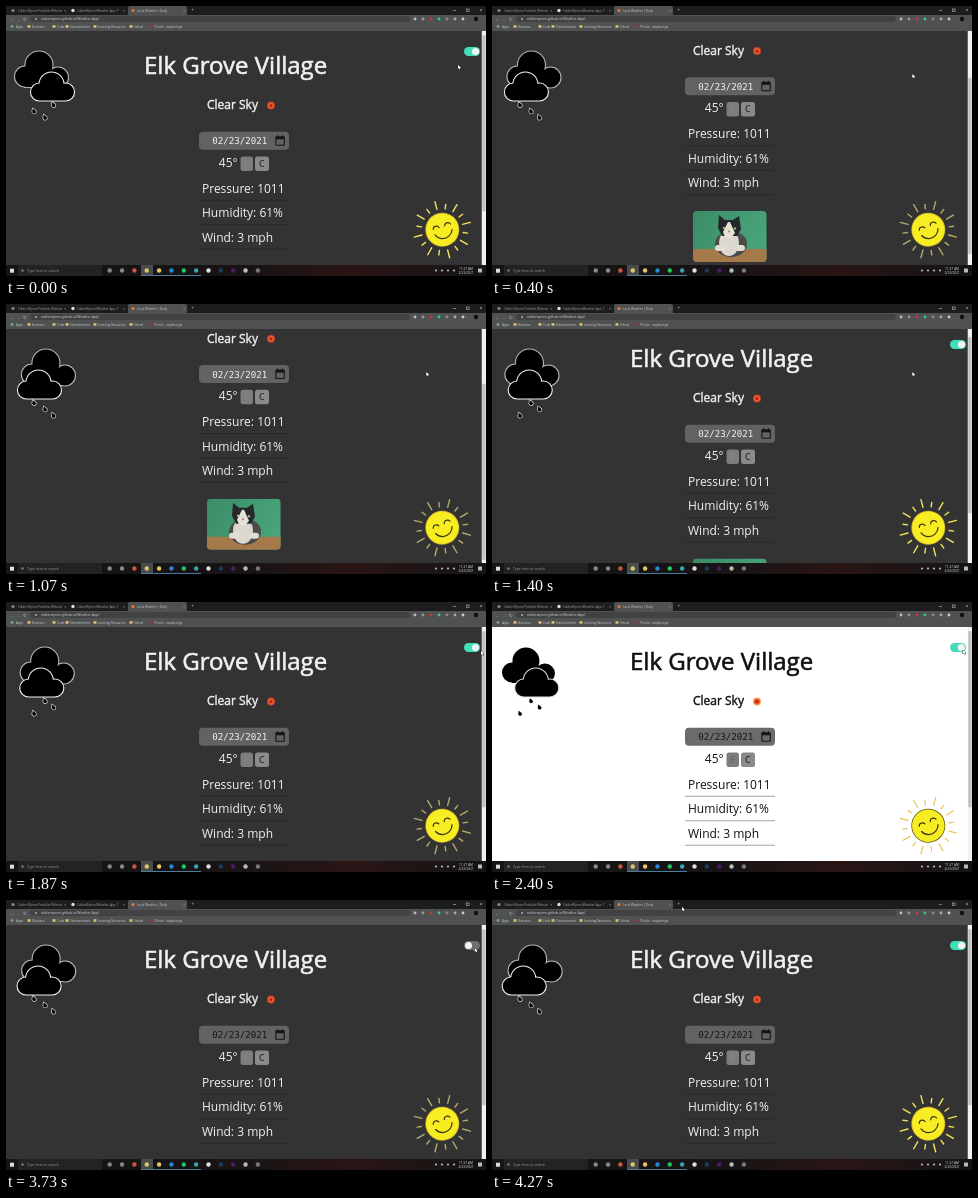
Recreate the animation shown at these times as an HTML page with a canvas. Size 480x270 px, loop 4340 ms.

```html
<!DOCTYPE html>
<html lang="en">
<head>
<meta charset="utf-8">
<title>Weather page</title>
<style>
html, body { margin: 0; width: 100%; height: 100%; overflow: hidden; background: #333; }
canvas { display: block; width: 480px; height: 270px; }
</style>
</head>
<body>
<canvas id="stage" width="480" height="270"></canvas>
<script>
const ctx = document.getElementById('stage').getContext('2d');
const LOOP = 4340, LIGHT_ON = 2330, LIGHT_OFF = 3690, MAX_SCROLL = 64.7;
const SANS = '"Open Sans", sans-serif', MONO = '"DejaVu Sans Mono", monospace';

const clamp = (v) => Math.max(0, Math.min(1, v));
const ease = (p) => p < 0.5 ? 4 * p ** 3 : 1 - 4 * (1 - p) ** 3;
const tween = (t, start, length) => ease(clamp((t - start) / length));
const lerp = (a, b, p) => a + (b - a) * p;

function rect(x, y, w, h, color, r = 0) {
  ctx.fillStyle = color;
  ctx.beginPath();
  ctx.roundRect(x, y, w, h, r);
  ctx.fill();
}

function oval(x, y, rx, ry, color) {
  ctx.fillStyle = color;
  ctx.beginPath();
  ctx.ellipse(x, y, rx, ry, 0, 0, Math.PI * 2);
  ctx.fill();
}

const dot = (x, y, r, color) => oval(x, y, r, r, color);

function shape(points, color) {
  ctx.fillStyle = color;
  ctx.beginPath();
  points.forEach(([x, y]) => ctx.lineTo(x, y));
  ctx.closePath();
  ctx.fill();
}

function line(points, color, width = 0.6) {
  ctx.strokeStyle = color;
  ctx.lineWidth = width;
  ctx.beginPath();
  points.forEach(([x, y]) => ctx.lineTo(x, y));
  ctx.stroke();
}

function text(str, x, y, size, color, family = SANS, weight = 400) {
  ctx.font = `${weight} ${size}px ${family}`;
  ctx.fillStyle = color;
  ctx.fillText(str, x, y);
}

function heavyText(str, x, y, size, color, stroke) {
  text(str, x, y, size, color);
  ctx.strokeStyle = color;
  ctx.lineWidth = stroke;
  ctx.strokeText(str, x, y);
}

function browser() {
  rect(0, 0, 480, 9, '#1c1d1e');
  rect(122, 0, 59, 10, '#505153', 2);
  rect(0, 9, 480, 16, '#505153');
  rect(24, 10, 380, 6, '#414244', 3);

  dot(7, 4.5, 1.6, '#888');
  text('Calder Wynne Portfolio Website', 12, 5.6, 3, '#a0a0a0');
  dot(67, 4.5, 1.7, '#ddd');
  text('CalderWynne/Weather-App: T', 71, 5.6, 3, '#a0a0a0');
  dot(127, 4.5, 1.6, '#e07b3a');
  text('Local Weather | Daily', 131, 5.6, 3, '#ccc');
  [58, 117, 177].forEach((x) => text('×', x, 6, 4, '#aaa'));
  text('+', 185.5, 6, 4.5, '#bbb');

  line([[447, 4.5], [450, 4.5]], '#bbb');
  ctx.strokeRect(460.5, 3, 2.6, 2.6);
  text('×', 473.5, 6.2, 5, '#ccc');

  text('←', 3, 14.8, 4.5, '#bbb');
  text('→', 10, 14.8, 4.5, '#888');
  text('↻', 17, 14.8, 4.5, '#bbb');
  dot(30, 13, 1, '#aaa');
  text('calderwynne.github.io/Weather-App/', 35, 14.2, 3.4, '#d0d0d0');
  ['#bbb', '#999', '#c43a32', '#35c98a', '#888', '#aaa', '#ccc']
    .forEach((c, i) => dot(409 + i * 8, 13, 1.4, c));
  dot(470, 13, 2.2, '#111');

  dot(6, 20.5, 1.4, '#78a878');
  text('Apps', 10, 21.7, 3, '#ccc');
  const folders = [['Business', 26], ['Code', 51], ['Entertainment', 64],
    ['Learning Resources', 92], ['School', 128]];
  for (const [name, x] of folders) {
    rect(x - 4.5, 19.2, 3, 2.5, '#e5c36a');
    text(name, x, 21.7, 3, '#ccc');
  }
  dot(144, 20.5, 1.3, '#a33');
  text('Pi-hole - raspberrypi', 148, 21.7, 3, '#ccc');
}

function taskbar() {
  const tint = ctx.createLinearGradient(0, 0, 480, 0);
  tint.addColorStop(0, '#141516');
  tint.addColorStop(0.5, '#181314');
  tint.addColorStop(0.72, '#2a1515');
  tint.addColorStop(1, '#141415');
  rect(0, 259, 480, 11, tint);
  rect(4, 262.7, 4, 4, '#ddd');
  rect(12, 259, 84, 11, '#222325');
  dot(16.5, 264.5, 1.3, '#777');
  text('Type here to search', 21, 266, 3.5, '#999');
  rect(135, 259, 12, 11, '#4a4b4c');
  rect(135, 269, 60, 1, '#4c7c9a');
  const icons = ['#888', '#888', '#d0553a', '#d9c86a', '#e9c568', '#2987d1',
    '#24c565', '#35a6b5', '#ddd', '#1b3c5c', '#4d1c60', '#bbb', '#777'];
  icons.forEach((c, i) => dot(103.7 + i * 12.35, 264.5, 2.2, c));
  [430, 436, 442, 448].forEach((x) => dot(x, 264.5, 1.1, '#bbb'));
  text('11:27 AM', 453, 263.6, 3.2, '#ddd');
  text('2/23/2021', 452.5, 268, 3.2, '#ddd');
  rect(472, 262.5, 4, 4, '#bbb', 0.6);
}

function toggle(on) {
  const green = [66, 222, 184], gray = [112, 112, 112];
  const mix = gray.map((g, i) => Math.round(lerp(g, green[i], on)));
  rect(458, 41, 16, 9, `rgb(${mix})`, 4.5);
  dot(lerp(462.5, 469.5, on), 45.5, 3.5, '#f4f4f4');
}

function catPhoto(x, y) {
  ctx.save();
  ctx.beginPath();
  ctx.roundRect(x, y, 73.5, 51, 4);
  ctx.clip();
  ctx.translate(x, y);
  const wall = ctx.createLinearGradient(0, 0, 73, 36);
  wall.addColorStop(0, '#3a8c66');
  wall.addColorStop(1, '#4aa67c');
  rect(0, 0, 74, 51, wall);
  rect(0, 38, 74, 13, '#a5794a');
  oval(38, 33, 16, 13, '#4b4c49');
  oval(36, 32, 10, 13, '#dcd8cf');
  shape([[26, 4], [32, 9], [40, 9], [46, 5], [48, 18], [44, 25], [29, 25], [25, 17]], '#24282a');
  shape([[35, 11], [37, 11], [42, 22], [38, 27], [32, 26], [30, 21]], '#e6e1d9');
  dot(31, 17, 1.2, '#aeb277');
  dot(42, 17.5, 1.2, '#aeb277');
  dot(36, 20.5, 1, '#a97d76');
  rect(22, 34, 11, 6, '#e2ddd4', 3);
  rect(42, 34, 10, 6, '#e2ddd4', 3);
  ctx.restore();
}

function calendarIcon(x, y, back) {
  rect(x, y + 1, 9.5, 9.5, '#151515', 1);
  rect(x + 1.8, y, 1.2, 2, '#151515');
  rect(x + 6.5, y, 1.2, 2, '#151515');
  rect(x + 1.1, y + 4, 7.3, 5.4, back);
}

function page(scroll, light, on, dateColor) {
  const ink = light ? '#111' : '#f2f2f2';
  const field = light ? '#6b6b6b' : '#626262';
  ctx.save();
  ctx.translate(0, -scroll);
  heavyText('Elk Grove Village', 138, 67.5, 24, ink, 0.6);
  heavyText('Clear Sky', 201, 103.3, 12, ink, 0.4);
  dot(265, 99.5, 4, light ? '#f6b25c' : '#b8432b');
  dot(265, 99.5, 3.1, '#f2562c');
  dot(265, 99.7, 1.4, '#a3261a');
  toggle(on);

  rect(193, 125.7, 90, 18, field, 4);
  text('02/23/2021', 206.3, 138.2, 9.15, dateColor, MONO);
  calendarIcon(269.3, 129.3, field);

  text('45°', 212.8, 160.7, 12, ink);
  rect(234.5, 150.5, 12.5, 14.5, '#7d7d7d', 2.5);
  text('F', 238.5, 161, 8.5, light ? '#5c5c5c' : '#8a8a8a');
  rect(249, 150.5, 14, 14.5, '#8a8a8a', 2.5);
  text('C', 253, 161, 8.5, '#2c2c2c', SANS, 600);

  ['Pressure: 1011', 'Humidity: 61%', 'Wind: 3 mph'].forEach((row, i) => {
    text(row, 196, 186.8 + i * 24.5, 12, ink);
    rect(193, 193.8 + i * 24.5, 90, 1, light ? '#a5a5a5' : '#292929');
  });
  catPhoto(201, 259.5);
  ctx.restore();
}

function blob(circles, base, edge) {
  const path = new Path2D();
  for (const [x, y, r] of circles) {
    path.moveTo(x + r, y);
    path.arc(x, y, r, 0, Math.PI * 2);
  }
  path.rect(...base);
  ctx.strokeStyle = edge;
  ctx.lineWidth = 2.2;
  ctx.stroke(path);
  ctx.fillStyle = '#000';
  ctx.fill(path);
}

function raindrop(x, y, edge) {
  ctx.beginPath();
  ctx.moveTo(x - 1.3, y - 2.8);
  ctx.quadraticCurveTo(x + 3, y - 0.5, x + 1.7, y + 1.6);
  ctx.quadraticCurveTo(x - 1, y + 3.2, x - 1.8, y + 0.6);
  ctx.closePath();
  ctx.strokeStyle = edge;
  ctx.lineWidth = 1.4;
  ctx.stroke();
  ctx.fillStyle = '#000';
  ctx.fill();
}

// The two clouds sway in opposite directions.
function cloud(t, light) {
  const edge = light ? '#ddd' : '#f0f0f0';
  const sway = Math.cos(t / 296 * Math.PI * 2);
  const back = 39 - 4 * sway, front = 39 + 7.5 * sway;
  blob([[back - 2, 59, 13.5], [back - 16, 70.5, 10], [back + 17, 71.5, 10]],
    [back - 16, 66, 33, 15], light ? '#fff' : '#b5b5b5');
  blob([[front - 13, 86, 8.5], [front - 1, 78.5, 12], [front + 13, 86, 8.5]],
    [front - 13, 80, 26, 14.5], edge);
  const step = Math.floor(t / 180);
  [28, 39, 47.5].forEach((x, i) => {
    const phase = (step + 1 + i) % 3;
    raindrop(x, 99 + phase * 6.3, light ? '#fff' : '#ddd');
  });
}

function sun(t, light) {
  const beat = Math.floor(t / 110) % 2;
  const rayColor = light ? '#eebd4a' : beat ? '#b3a970' : '#f3e25a';
  ctx.save();
  ctx.translate(436.3, 223.7);
  ctx.lineCap = 'round';
  for (let i = 0; i < 16; i++) {
    const a = (i + 0.5) / 16 * Math.PI * 2 + (beat ? 0.06 : -0.06);
    const far = (i + beat) % 2 ? 29 : 25.5;
    line([[Math.cos(a) * 21, Math.sin(a) * 21], [Math.cos(a) * far, Math.sin(a) * far]],
      rayColor, light ? 1.1 : 1.4);
  }
  ctx.rotate(beat ? -0.4 : -0.3);
  dot(0, 0, 17, light ? '#5d5310' : '#c9b030');
  dot(0, 0, 16.2, '#f8ec22');
  ctx.strokeStyle = '#3d3510';
  ctx.lineWidth = 1.2;
  const arc = (x, y, r, from, to) => {
    ctx.beginPath();
    ctx.arc(x, y, r, from, to);
    ctx.stroke();
  };
  arc(-5.5, -2, 3.2, Math.PI * 1.1, Math.PI * 1.9);
  arc(6.5, -2, 3.2, Math.PI * 1.1, Math.PI * 1.9);
  arc(0.5, -0.5, 9.5, 0.35, Math.PI - 0.35);
  ctx.restore();
}

function scrollbar(scroll) {
  rect(475.75, 25, 4.25, 234, '#f1f1f1');
  rect(476.25, 29.25 + scroll * 0.78, 3.25, 176, '#c1c1c1');
}

const cursorPath = [[0, 452, 59], [350, 420.3, 68], [1500, 420.3, 68], [1850, 475, 49],
  [2250, 471, 48], [3270, 469, 48], [3700, 469, 48], [4200, 190, 7], [LOOP, 190, 7]];

function cursor(t) {
  const i = cursorPath.findIndex(([time]) => time > t);
  const [t0, x0, y0] = cursorPath[i - 1], [t1, x1, y1] = cursorPath[i];
  const p = tween(t, t0, t1 - t0);
  ctx.save();
  ctx.translate(lerp(x0, x1, p), lerp(y0, y1, p));
  const arrow = [[0, 0], [0, 4], [1, 3.1], [1.8, 4.5], [2.4, 4.1], [1.8, 2.9], [2.9, 2.8]];
  line([...arrow, arrow[0]], '#222', 0.8);
  shape(arrow, '#fff');
  ctx.restore();
}

// The page stalls briefly before the second switch.
const stall = (t) => t > 3470 && t < 3670 ? 3470 : t;

function draw(t) {
  const light = t >= LIGHT_ON && t < LIGHT_OFF;
  const on = 1 - tween(t, LIGHT_ON, 400) + tween(t, LIGHT_OFF, 400);
  const scroll = MAX_SCROLL * (tween(t, 170, 350) - tween(t, 1130, 370));

  ctx.save();
  ctx.beginPath();
  ctx.rect(0, 25, 480, 234);
  ctx.clip();
  rect(0, 25, 480, 234, light ? '#fff' : '#333');
  page(scroll, light, on, t < LIGHT_ON ? '#f2f2f2' : '#151515');
  cloud(stall(t), light);
  sun(stall(t), light);
  scrollbar(scroll);
  ctx.restore();

  browser();
  taskbar();
  cursor(t);
}

const begin = performance.now();
function tick() {
  draw((performance.now() - begin) % LOOP);
  requestAnimationFrame(tick);
}
tick();
</script>
</body>
</html>
```
